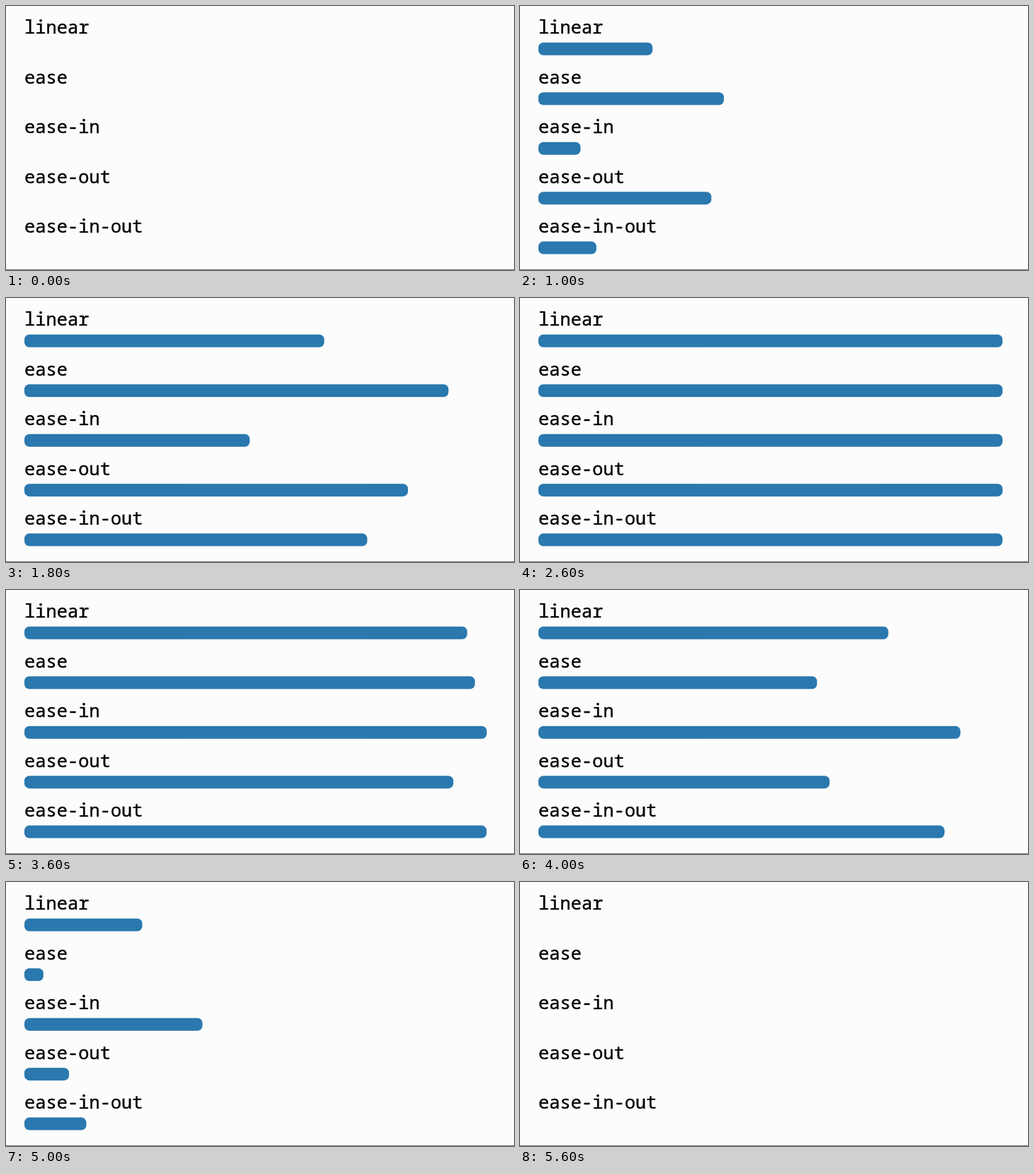
Recreate the animation shown at these times as an HTML page. Size 718 by 374 pixels, loop 6000 ms.

```html
<!DOCTYPE html>
<html lang="en">
<head>
<meta charset="utf-8">
<title>Timing functions</title>
<style>
  html, body { margin: 0; width: 100%; height: 100%; overflow: hidden; background: #fcfcfc; }
  svg { display: block; width: 718px; height: 374px; }
  text { font: 25.4px "Roboto Mono", "Noto Sans Mono", monospace; fill: #000; stroke: #000; stroke-width: 0.4px; }
  .bar { fill: #2a78ae; }
</style>
</head>
<body>
<svg id="stage" viewBox="0 0 718 374">
  <rect width="718" height="374" fill="#fcfcfc"/>
  <rect y="373" width="718" height="1" fill="#747474"/>
</svg>
<script>
const LOOP = 6000, TICK = 100, RUN = 2000;
const GROW = 508, SHRINK = 3508;
const LEFT = 26, FULL = 656, RADIUS = 7, PITCH = 70.45;

const stage = document.getElementById('stage');

function add(tag, attrs, text = '') {
  const el = document.createElementNS(stage.namespaceURI, tag);
  for (const key in attrs) el.setAttribute(key, attrs[key]);
  el.textContent = text;
  return stage.appendChild(el);
}

// CSS cubic-bezier, solved for x by bisection
function bezier(x1, y1, x2, y2) {
  const at = (a, b, s) => 3 * a * s * (1 - s) ** 2 + 3 * b * s * s * (1 - s) + s ** 3;
  return x => {
    if (x <= 0 || x >= 1) return x <= 0 ? 0 : 1;
    let lo = 0, hi = 1;
    for (let i = 0; i < 30; i++) {
      const mid = (lo + hi) / 2;
      if (at(x1, x2, mid) < x) lo = mid; else hi = mid;
    }
    return at(y1, y2, lo);
  };
}

const rows = [
  ['linear', bezier(0, 0, 1, 1)],
  ['ease', bezier(0.25, 0.1, 0.25, 1)],
  ['ease-in', bezier(0.42, 0, 1, 1)],
  ['ease-out', bezier(0, 0, 0.58, 1)],
  ['ease-in-out', bezier(0.42, 0, 0.58, 1)]
].map(([name, ease], i) => {
  add('text', { x: LEFT, y: 39.4 + PITCH * i }, name);
  const bar = add('rect', { class: 'bar', x: LEFT, y: 51.8 + PITCH * i, height: 18 });
  return { bar, ease };
});

function draw(ms) {
  // the picture advances in steps of one tick
  const t = Math.floor((ms % LOOP) / TICK) * TICK;
  for (const { bar, ease } of rows) {
    const width = FULL * (ease((t - GROW) / RUN) - ease((t - SHRINK) / RUN));
    const r = Math.min(RADIUS, width / 2);
    bar.setAttribute('width', width);
    bar.setAttribute('rx', r);
    bar.setAttribute('ry', r);
  }
}

const start = performance.now();
function frame() {
  draw(performance.now() - start);
  requestAnimationFrame(frame);
}
frame();
</script>
</body>
</html>
```
